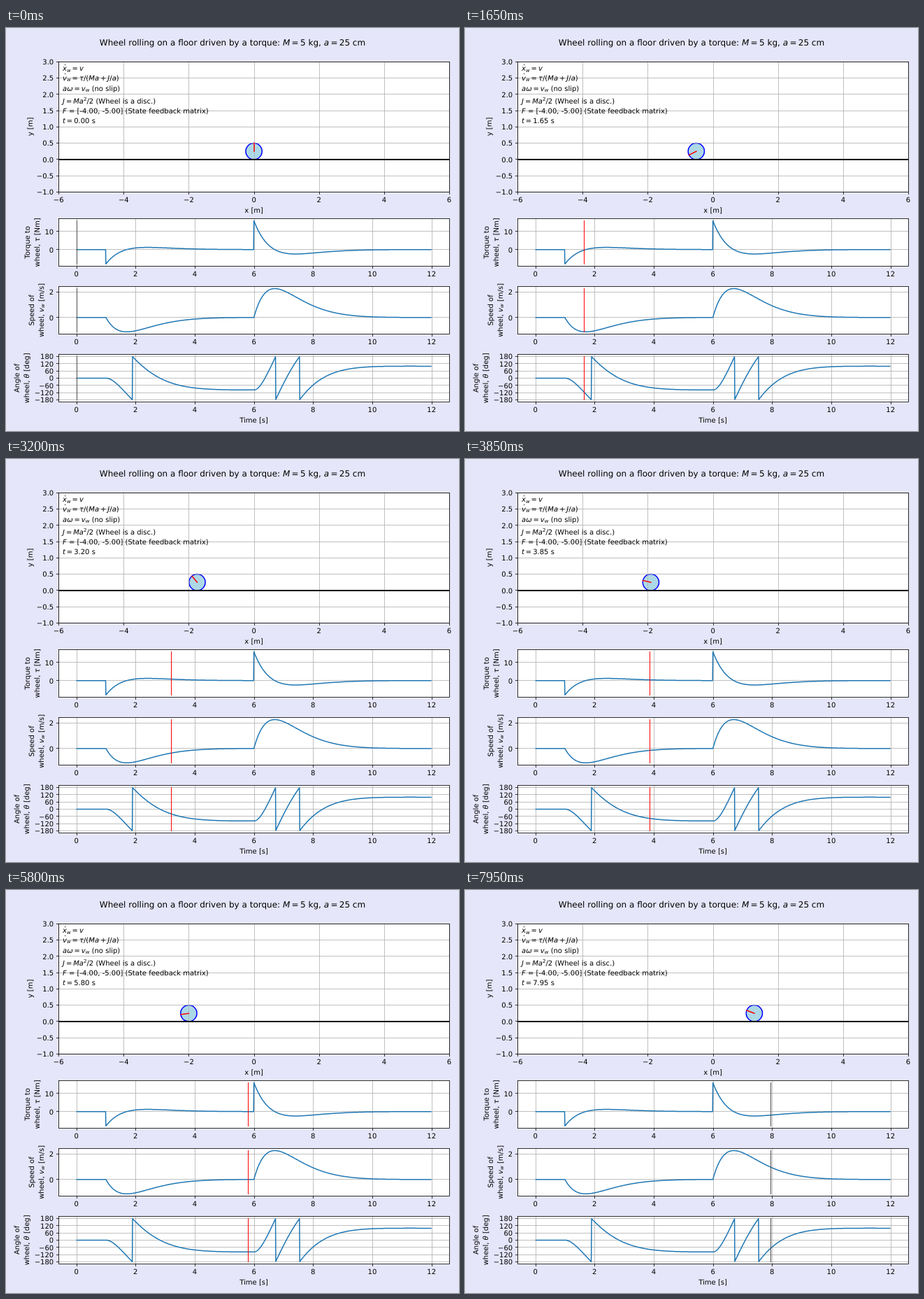
Animation, 648 px wide and 576 px high, one loop 8 s. Source, as an HTML page:

```html
<!DOCTYPE html>
<html lang="en">
<head>
<meta charset="utf-8">
<title>Rolling wheel</title>
<style>
  html, body { margin: 0; width: 100%; height: 100%; overflow: hidden; background: #e6e6fa; }
  svg { display: block; }
  text { font: 10px "DejaVu Sans", sans-serif; white-space: pre; text-rendering: geometricPrecision; }
  .it { font-style: italic; }
</style>
</head>
<body>
<svg id="stage" width="648" height="576" viewBox="0 0 648 576"></svg>
<script>
const stage = document.getElementById('stage');
const LEFT = 75.17, RIGHT = 634.06, STEP = 50, LOOP = 8000;
const RADIUS = 0.25, MASS = 5, K_POS = 4, K_VEL = 5;

function el(parent, name, attrs = {}) {
  const node = document.createElementNS('http://www.w3.org/2000/svg', name);
  for (const key in attrs) node.setAttribute(key, attrs[key]);
  parent.appendChild(node);
  return node;
}

const line = (parent, x1, y1, x2, y2, stroke, width) =>
  el(parent, 'line', { x1, y1, x2, y2, stroke, 'stroke-width': width });

// Markup: *italic*, _subscript, ^superscript, ~operator~ with math spacing.
function label(x, y, source, { anchor = 'start', size = 10, turn = 0 } = {}) {
  const node = el(stage, 'text', {
    'text-anchor': anchor, transform: `translate(${x} ${y}) rotate(${turn})`,
    style: `font-size:${size}px`
  });
  let dx = 0, dy = 0;
  for (const part of source.split(/(\*[^*]+\*|_.|\^.|~.~)/)) {
    if (!part) continue;
    const kind = part[0], attrs = {};
    let body = part, shift = 0, gap = 0;
    if (kind === '*') { body = part.slice(1, -1); attrs.class = 'it'; }
    if (kind === '~') { body = part[1]; gap = size * 0.195; }
    if (kind === '_' || kind === '^') {
      body = part[1];
      shift = kind === '_' ? 1.6 : -3.8;
      attrs.style = `font-size:${size * 0.7}px`;
      if (kind === '_') attrs.class = 'it';
    }
    attrs.dx = dx + gap;
    attrs.dy = dy + shift;
    el(node, 'tspan', attrs).textContent = body;
    dx = gap;
    dy = -shift;
  }
  return node;
}

const range = (from, to, by) =>
  Array.from({ length: Math.round((to - from) / by) + 1 }, (_, i) => from + i * by);
const column = x => Math.round(x) + 0.5;
const row = y => Math.floor(y) + 0.5;

function axes({ top, bottom, xs, ys, xTicks, yTicks, digits = 0 }) {
  const X = v => LEFT + (v - xs[0]) / (xs[1] - xs[0]) * (RIGHT - LEFT);
  const Y = v => bottom - (v - ys[0]) / (ys[1] - ys[0]) * (bottom - top);
  const l = column(LEFT), r = column(RIGHT), t = row(top), b = row(bottom);
  const box = { x: l, y: t, width: r - l, height: b - t };
  const name = (v, n) => v.toFixed(n).replace('-', '\u2212');

  el(stage, 'rect', { ...box, fill: '#fff' });
  const under = el(stage, 'g'), grid = el(stage, 'g'), data = el(stage, 'g');
  for (const v of xTicks) {
    const x = column(X(v));
    line(grid, x, t, x, b, '#b0b0b0', 0.8);
    line(stage, x, b, x, b + 3.5, '#000', 0.8);
    label(X(v), bottom + 14.5, name(v, 0), { anchor: 'middle' });
  }
  for (const v of yTicks) {
    const y = row(Y(v));
    line(grid, l, y, r, y, '#b0b0b0', 0.8);
    line(stage, l - 3.5, y, l, y, '#000', 0.8);
    label(LEFT - 7, Y(v) + 3.8, name(v, digits), { anchor: 'end' });
  }
  el(stage, 'rect', { ...box, fill: 'none', stroke: '#000', 'stroke-width': 0.8 });
  return { X, Y, under, data };
}

// Closed-loop step response of the wheel under state feedback.
const inertia = MASS * RADIUS + MASS * RADIUS / 2;
const sigma = K_VEL / inertia / 2;
const omega = Math.sqrt(K_POS / inertia - sigma * sigma);
const rise = u => u <= 0 ? 0 :
  1 - Math.exp(-sigma * u) * (Math.cos(omega * u) + sigma / omega * Math.sin(omega * u));
const slope = u => u <= 0 ? 0 :
  K_POS / inertia / omega * Math.exp(-sigma * u) * Math.sin(omega * u);

const goal = t => t < 1 ? 0 : t < 6 ? -2 : 2;
const position = t => -2 * rise(t - 1) + 4 * rise(t - 6);
const speed = t => -2 * slope(t - 1) + 4 * slope(t - 6);
const torque = t => K_POS * (goal(t) - position(t)) - K_VEL * speed(t);
const degrees = t => {
  const d = position(t) / RADIUS * 180 / Math.PI + 180;
  return d - 360 * Math.floor(d / 360) - 180;
};

label(324, 24.5, 'Wheel rolling on a floor driven by a torque: *M*~=~5 kg, *a*~=~25 cm',
  { anchor: 'middle', size: 12 });

const floor = axes({
  top: 48.18, bottom: 234.48, xs: [-6, 6], ys: [-1, 3],
  xTicks: range(-6, 6, 2), yTicks: range(-1, 3, 0.5), digits: 1
});
label(354.6, 263.8, 'x [m]', { anchor: 'middle' });
label(38, 141, 'y [m]', { anchor: 'middle', turn: -90 });

const unit = floor.X(1) - floor.X(0);
const hubY = floor.Y(RADIUS);
const rim = RADIUS * unit;
const wheel = el(floor.under, 'circle', {
  cy: hubY, r: rim, fill: 'lightblue', stroke: '#00f', 'stroke-width': 1.5
});
line(floor.data, LEFT, 188, RIGHT, 188, '#000', 2);
const hand = line(floor.data, 0, hubY, 0, 0, '#f00', 1.5);
hand.setAttribute('stroke-linecap', 'square');

label(81, 61.4, '*x*_w~=~*v*');
label(81, 74.5, '*v*_w~=~*τ*/(*Ma*~+~*J*/*a*)');
label(81, 89.5, '*aω*~=~*v*_w (no slip)');
label(81, 107.5, '*J*~=~*Ma*^2/2 (Wheel is a disc.)');
label(81, 122, '*F* = [-4.00, -5.00] (State feedback matrix)');
const clock = label(81, 136.2, '*t*~=~0.00 s').lastChild;
for (const y of [52.7, 65.4]) el(stage, 'circle', { cx: 84.6, cy: y, r: 0.65 });

const peak = slope(Math.atan(omega / sigma) / omega);
const cursors = [
  { top: 272.4, fn: torque, low: -8, high: 16, yTicks: [0, 10],
    names: ['Torque to', 'wheel, *τ* [Nm]'], at: 48 },
  { top: 369.4, fn: speed, low: -2 * peak, high: 4 * peak, yTicks: [0, 2],
    names: ['Speed of', 'wheel, *v*_w [m/s]'], at: 53.6 },
  { top: 466.4, fn: degrees, low: -180, high: 180, yTicks: range(-180, 180, 60),
    names: ['Angle of', 'wheel, *θ* [deg]'], at: 32.8 }
].map(({ top, fn, low, high, yTicks, names, at }) => {
  const pad = (high - low) * 0.05;
  const plot = axes({
    top, bottom: top + 68, xs: [-0.6, 12.6], ys: [low - pad, high + pad],
    xTicks: range(0, 12, 2), yTicks
  });
  const points = range(0, 1200, 1).map(i =>
    plot.X(i / 100).toFixed(2) + ',' + plot.Y(fn(i / 100)).toFixed(2));
  el(plot.data, 'polyline', {
    points: points.join(' '), fill: 'none', stroke: '#1f77b4',
    'stroke-width': 1.5, 'stroke-linejoin': 'round'
  });
  names.forEach((s, i) =>
    label(at - 13.8 + 13.8 * i, top + 34, s, { anchor: 'middle', turn: -90 }));
  const mark = line(plot.data, 0, row(plot.Y(high)) - 0.5, 0, row(plot.Y(low)) + 0.5, '#f00', 1);
  return { mark, X: plot.X };
});
label(354.6, 564.2, 'Time [s]', { anchor: 'middle' });

function set(node, attrs) {
  for (const key in attrs) node.setAttribute(key, attrs[key]);
}

function draw(t) {
  const x = position(t), hub = floor.X(x), angle = x / RADIUS;
  const pivot = x ? hub : Math.round(hub);
  set(wheel, { cx: hub });
  set(hand, {
    x1: pivot, x2: pivot + rim * Math.sin(angle), y2: hubY - rim * Math.cos(angle)
  });
  clock.textContent = t.toFixed(2) + ' s';
  for (const { mark, X } of cursors) {
    const c = column(X(t));
    // Colour survives only on even pixel columns.
    set(mark, { x1: c, x2: c, stroke: Math.floor(c) % 2 ? '#4c4c4c' : '#f00' });
  }
}

const start = performance.now();
function tick() {
  const elapsed = (performance.now() - start) % LOOP;
  draw(Math.floor(elapsed / STEP) * STEP / 1000);
  requestAnimationFrame(tick);
}
tick();
</script>
</body>
</html>
```
